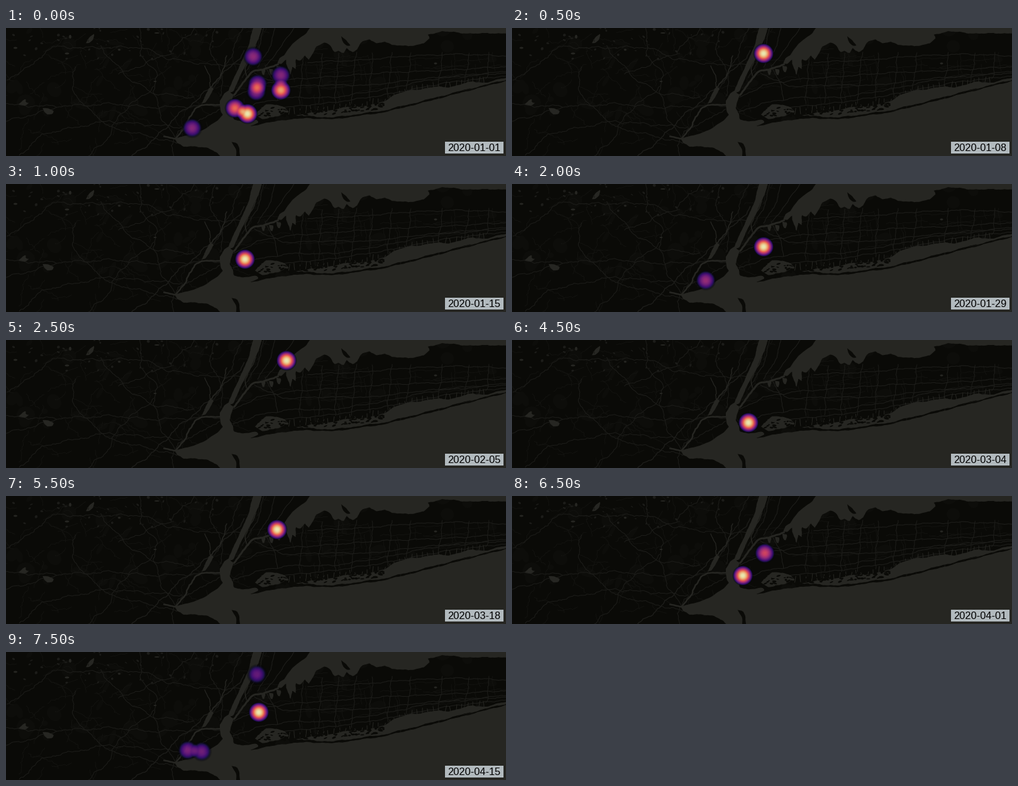
A matplotlib script that plays this animation: 795x206 px, repeating every 8000 ms.

```python
import matplotlib.pyplot as plt
import numpy as np
from matplotlib.animation import FuncAnimation
from matplotlib.patches import Ellipse, Rectangle

W, H, DPI = 795, 206, 100
LAND, WATER = "#0a0a07", "#262622"
ROAD, LANE, PARK = "#1d1d1a", "#141411", "#0d0d0a"
RADIUS = 17
START = np.datetime64("2020-01-01")
rng = np.random.default_rng(7)

fig = plt.figure(figsize=(W / DPI, H / DPI), dpi=DPI, facecolor=LAND)
ax = fig.add_axes([0, 0, 1, 1])
ax.set(xlim=(0, W), ylim=(H, 0))
ax.axis("off")


def px(n):
    return n * 72 / DPI


def wiggle(points, amp=1.0, step=3):
    """Resample a polyline and make it uneven, like a coast or a road."""
    p = np.array(points, float)
    dist = np.r_[0, np.cumsum(np.hypot(*np.diff(p, axis=0).T))]
    s = np.linspace(0, dist[-1], max(int(dist[-1] / step), 2))
    out = np.c_[np.interp(s, dist, p[:, 0]), np.interp(s, dist, p[:, 1])]
    for length in (9, 23, 50):
        phase = rng.uniform(0, 6.28, 2)
        wave = np.sin(s[:, None] * 6.28 / length + phase)
        out += amp * wave * (length / 50) ** 0.5
    return out


def road(points, color=ROAD, width=1.0, amp=1.0, z=2):
    ax.plot(*wiggle(points, amp).T, color=color, lw=px(width), zorder=z)


def area(points, color=WATER, amp=0.7, z=3):
    ax.fill(*wiggle(points + points[:1], amp).T, color=color, lw=0, zorder=z)


def blob(x, y, w, h, angle=0, color=WATER, z=3):
    ax.add_patch(Ellipse((x, y), w, h, angle=angle, color=color, lw=0, zorder=z))


# Faint parks and small lanes
for _ in range(60):
    blob(*rng.uniform((0, 0), (W, 150)), *rng.uniform(6, 30, 2),
         rng.uniform(0, 180), PARK, 1)
for _ in range(95):
    x, y = rng.uniform((0, 0), (400, H))
    a, n = rng.uniform(0, 6.28), rng.uniform(20, 55)
    road([(x, y), (x + n * np.cos(a), y + n * np.sin(a))], LANE, 0.8, 2)
for _ in range(75):
    x, y = rng.uniform((360, 30), (W, 125))
    if rng.random() < 0.5:
        road([(x, y), (x + rng.uniform(25, 70), y - 4)], LANE, 0.8)
    else:
        road([(x, y), (x + 4, y + rng.uniform(12, 35))], LANE, 0.8)

# Highways west of the river
for line in [
    [(0, 123), (50, 126), (110, 125), (170, 122), (230, 128), (300, 126), (345, 124)],
    [(0, 85), (40, 60), (75, 30), (120, 32), (215, 31), (260, 50), (330, 60), (380, 58)],
    [(150, 30), (175, 60), (200, 85), (235, 105), (300, 112)],
    [(215, 0), (213, 40), (240, 75), (235, 105), (250, 150), (270, 178)],
    [(110, 60), (105, 100), (125, 125), (165, 160), (230, 175), (270, 185)],
    [(130, 206), (160, 180), (180, 140), (200, 122), (235, 95)],
]:
    road(line, amp=1.3)
for line in [
    [(20, 206), (60, 170), (110, 160), (160, 150), (220, 155), (280, 160)],
    [(330, 0), (325, 40), (345, 75), (340, 110)],
    [(300, 0), (260, 40), (215, 60), (180, 75)],
    [(375, 0), (360, 40), (340, 80), (318, 112)],
    [(0, 150), (40, 140), (80, 128)],
    [(270, 206), (262, 190), (275, 165), (310, 148), (340, 130)],
]:
    road(line, amp=1.3)
road([(200, 206), (235, 180), (270, 143), (310, 110), (340, 80), (380, 38)], width=1.4)

# Highways east of the river
for line in [
    [(410, 0), (400, 40), (375, 80)],
    [(428, 0), (417, 38), (400, 62)],
    [(458, 0), (437, 30), (415, 60)],
    [(362, 112), (400, 92), (450, 83), (520, 78), (600, 72), (700, 68), (795, 62)],
    [(395, 72), (440, 94), (500, 92), (580, 92), (660, 82), (795, 70)],
    [(362, 135), (400, 121), (450, 112), (520, 112), (600, 99), (680, 82), (795, 72)],
    [(440, 128), (520, 120), (600, 108), (700, 88), (795, 77)],
    [(480, 55), (560, 52), (640, 45), (720, 42), (795, 45)],
    [(412, 60), (425, 85), (432, 115)],
]:
    road(line, width=1.1, amp=0.7)
for x in (470, 500, 526, 553, 580, 610, 640, 690, 732, 765):
    road([(x + 4, 40), (x, 75), (x - 3, 122 - max(x - 560, 0) * 0.2)])

# Ocean and lower bay
area([(268, 177), (285, 174), (302, 169), (320, 160), (336, 149), (345, 140),
      (341, 131), (340, 118), (346, 106), (354, 101), (362, 107), (359, 118),
      (355, 130), (361, 140), (362, 147), (375, 150), (397, 148), (402, 152),
      (388, 158), (440, 148), (480, 145), (520, 147), (600, 136), (660, 121),
      (720, 105), (800, 84), (800, 212), (347, 212), (335, 200), (318, 193),
      (300, 190), (282, 191), (272, 186)], amp=0.5)
area([(359, 183), (367, 185), (371, 193), (373, 212), (366, 212), (366, 196)],
     LAND, 0.3, 4)

# Sound with its northern harbors
area([(487, -6), (478, 8), (466, 17), (456, 25), (449, 34), (443, 43), (434, 49),
      (431, 58), (438, 58), (446, 50), (447, 62), (452, 76), (455, 62), (462, 66),
      (460, 50), (468, 53), (474, 45), (482, 51), (489, 39), (493, 30), (506, 24),
      (516, 27), (522, 39), (529, 36), (536, 41), (541, 33), (552, 39), (559, 34),
      (565, 22), (578, 19), (590, 25), (604, 21), (614, 28), (640, 29), (664, 25),
      (673, 17), (670, 11), (694, 5), (720, 8), (760, 9), (800, 8), (800, -6)],
     amp=0.6)
area([(533, 14), (541, 20), (548, 28), (543, 29), (536, 23)], LAND, 0.3, 4)

# Rivers
area([(394, -4), (407, -4), (403, 14), (394, 34), (382, 58), (371, 80), (361, 103),
      (353, 104), (360, 85), (372, 60), (385, 30)], amp=0.4)
road([(362, 108), (372, 96), (383, 80), (391, 70), (410, 67), (432, 58)],
     WATER, 3, 0.6, 3)
road([(383, 80), (380, 65), (389, 46), (397, 28)], WATER, 1.3, 0.5, 3)
for x, y in ((405, 71), (418, 71), (430, 66)):
    area([(x, y - 5), (x + 8, y - 4), (x + 5, y + 6), (x + 2, y + 4)], amp=0.3)
area([(325, 94), (330, 98), (325, 108), (318, 119), (311, 122), (318, 106)], amp=0.4)
road([(342, 122), (328, 124), (312, 124), (300, 130), (292, 143), (287, 158),
      (278, 168), (268, 178), (252, 174)], WATER, 2.4, 0.7, 3)
road([(327, 96), (338, 80), (347, 62), (352, 45)], WATER, 1.4, 1, 3)
road([(326, 96), (323, 76), (315, 60)], WATER, 1.2, 1, 3)

# Inner bay and the long southern lagoon
area([(396, 139), (405, 128), (416, 123), (430, 124), (443, 128), (450, 134),
      (440, 140), (425, 144), (408, 146)])
area([(458, 141), (480, 137), (510, 133), (545, 127), (580, 124), (603, 118),
      (615, 108), (640, 101), (680, 95), (705, 95), (742, 86), (762, 88), (800, 79),
      (800, 82), (720, 102), (660, 118), (600, 133), (520, 144), (480, 142)], amp=0.6)
for _ in range(22):
    blob(*rng.uniform((402, 127), (446, 142)), rng.uniform(3, 8),
         rng.uniform(1.5, 3.5), rng.uniform(-30, 30), LAND, 4)
for _ in range(60):
    x = rng.uniform(460, 605)
    y = 141 - (x - 460) * 0.1 + rng.uniform(-8, 3)
    blob(x, y, rng.uniform(3, 9), rng.uniform(1.5, 3.5), rng.uniform(-25, 10), LAND, 4)
for x in np.linspace(450, 760, 36):
    y = np.interp(x, [450, 545, 603, 640, 760], [136, 128, 119, 101, 86])
    road([(x, y + 3), (x + rng.uniform(-2, 3), y - rng.uniform(3, 9))], WATER, 1, 0.2, 3)

# Lakes
area([(58, 129), (66, 129), (76, 133), (74, 138), (66, 139), (61, 136)], amp=0.3)
area([(20, 123), (27, 117), (32, 114), (31, 120), (37, 120), (30, 125)], amp=0.3)
area([(127, 25), (133, 14), (140, 9), (138, 19), (132, 25)], amp=0.4)
for lake in ((97, 41, 7, 3), (15, 32, 6, 3), (237, 86, 5, 2), (102, 14, 4, 6),
             (683, 57, 5, 3), (180, 35, 4, 3), (240, 8, 8, 2)):
    blob(*lake)
for _ in range(45):
    blob(*rng.uniform((0, 0), (345, 50)), *rng.uniform(1, 5, 2),
         rng.uniform(0, 180), "#1c1c19")

# Weekly hot spots: x, y, weight
WEEKS = [
    [(393, 46, .43), (437, 76, .4), (437, 100, .83), (400, 90, .43), (398, 102, .43),
     (364, 129, .7), (384, 138, 1), (296, 161, .4)],
    [(400, 41, 1)],
    [(380, 121, 1)],
    [(400, 97, 1)],
    [(308, 155, .45), (400, 101, 1)],
    [(446, 33, 1)],
    [(446, 24, 1)],
    [(370, 103, 1)],
    [(402, 92, 1)],
    [(376, 133, 1)],
    [(426, 76, 1)],
    [(431, 54, 1)],
    [(437, 90, 1)],
    [(367, 128, 1), (402, 92, .6)],
    [(402, 97, 1)],
    [(399, 36, .32), (402, 97, 1), (289, 158, .37), (311, 160, .35)],
]
yy, xx = np.mgrid[0:H, 0:W] + 0.5


def heat(spots):
    total = np.zeros((H, W))
    for x, y, weight in spots:
        d2 = ((xx - x) ** 2 + (yy - y) ** 2) / RADIUS ** 2
        total += weight * np.clip(1 - d2, 0, 1) ** 1.4
    rgba = plt.cm.magma(np.clip(total, 0, 0.99))
    rgba[..., 3] = np.clip(total * 7, 0, 0.93)
    return rgba


layer = ax.imshow(heat(WEEKS[0]), extent=(0, W, H, 0), aspect="auto",
                  interpolation="nearest", zorder=6)
ax.add_patch(Rectangle((698, 183), 93, 19, color="#b2babe", lw=0, zorder=7))
label = ax.text(744.5, 198, "", family="Liberation Sans", size=px(16.4),
                color="black", ha="center", va="baseline", zorder=8)


def update(i):
    layer.set_data(heat(WEEKS[i]))
    label.set_text(str(START + 7 * i))
    return layer, label


anim = FuncAnimation(fig, update, frames=len(WEEKS), interval=500, repeat=True,
                     repeat_delay=0, blit=False)
plt.show()
```
